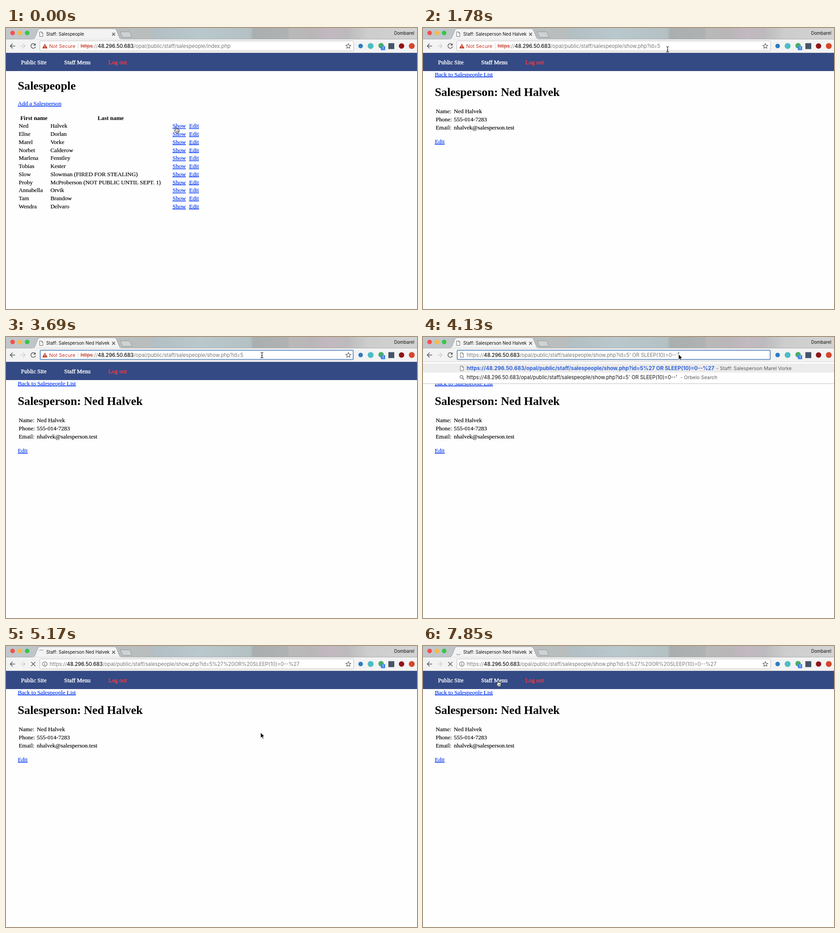
Animation of 904 by 620 pixels, one loop 8 s. Source, as an HTML page:

```html
<!DOCTYPE html>
<html lang="en">
<head>
<meta charset="utf-8">
<title>Staff browser</title>
<style>
html, body { margin: 0; width: 100%; height: 100%; overflow: hidden; background: #fefefe; }
svg { display: block; width: 100vw; height: 100vh; }
text { white-space: pre; }
.page { font: 12.88px "Liberation Serif", serif; fill: #000; stroke: #000; stroke-width: .18px; }
.bold { font-weight: 700; stroke: none; }
.h1 { font-size: 25.75px; font-weight: 700; stroke: none; }
.link { fill: #0035ee; stroke: #0035ee; text-decoration: underline; }
.nav { fill: #fff; stroke: #fff; stroke-width: .4px; }
.out { fill: #fb3b42; stroke: #fb3b42; stroke-width: .35px; }
.tab { font: 9.7px Inter, sans-serif; fill: #111; }
.ui { font: 11.15px Inter, sans-serif; fill: #777; }
.note { font: 10.8px Inter, sans-serif; fill: #5c5c5c; }
.ink { fill: #111; }
.host { fill: #111; font-weight: 500; }
.red { fill: #c53929; }
.strike { fill: #c53929; text-decoration: line-through; }
.hit { font-size: 11.5px; fill: #2f62d9; font-weight: 700; }
.line { fill: none; stroke: #5a5a5a; stroke-width: 1.5; }
.thin { fill: #fff; stroke: #666; stroke-width: 1; }
</style>
</head>
<body>
<svg id="stage" viewBox="0 0 904 620" preserveAspectRatio="none"></svg>
<script>
const LOOP = 8000, STEP = 148;
const HOST = '48.296.50.683';
const DIR = '/opal/public/staff/salespeople/';
const SHOW = 'show.php?id=5';
const PERSON = 'Ned Halvek';
const people = [
  ['Ned', 'Halvek'], ['Elise', 'Dorlan'], ['Marel', 'Vorke'],
  ['Norbet', 'Calderow'], ['Marlena', 'Fenstley'], ['Tobias', 'Kester'],
  ['Slow', 'Slowman (FIRED FOR STEALING)'],
  ['Proby', 'McProberson (NOT PUBLIC UNTIL SEPT. 1)'],
  ['Annabella', 'Orvik'], ['Tam', 'Brandow'], ['Wendra', 'Delvaro']
];

const text = (x, y, s, cls, more = '') => `<text x="${x}" y="${y}" class="${cls}" ${more}>${s}</text>`;
const span = (s, cls) => `<tspan class="${cls}">${s}</tspan>`;
const rect = (x, y, w, h, fill, more = '') => `<rect x="${x}" y="${y}" width="${w}" height="${h}" fill="${fill}" ${more}/>`;
const dot = (x, y, r, fill, more = '') => `<circle cx="${x}" cy="${y}" r="${r}" fill="${fill}" ${more}/>`;
const path = (d, cls, more = '') => `<path d="${d}" class="${cls}" ${more}/>`;
const group = (id, body) => `<g id="${id}">${body}</g>`;
const sheet = (x, y) => path('M-3.5-5H1L3.5-2.5V5H-3.5z M1-5V-2.5H3.5', 'thin', `transform="translate(${x} ${y})"`);

const address = (x, file, scheme = '') =>
  text(x, 43.8, span('https', scheme) + '://' + span(HOST, 'host') + DIR + file, 'ui');

const secureBar = file =>
  path('M85.5 34.5L91.3 45H79.7z', 'red') +
  path('M85.5 38v3.4M85.5 42.4v1.3', '', 'stroke="#fff" stroke-width="1.3"') +
  text(95, 43.8, 'Not Secure', 'ui red', 'style="font-size:10.9px"') +
  rect(158, 34, 1, 12, '#ccc') +
  address(164, file, 'strike');

const listPage =
  text(26, 135.5, 'Salespeople', 'page h1') +
  text(26, 171, 'Add a Salesperson', 'page link') +
  text(31.5, 202.5, 'First name', 'page bold') +
  text(201.5, 202.5, 'Last name', 'page bold') +
  people.map(([first, last], i) => {
    const y = 220.3 + 17.75 * i;
    return text(28, y, first, 'page') + text(97.7, y, last, 'page') +
      text(366.3, y, 'Show', 'page link') + text(402.8, y, 'Edit', 'page link');
  }).join('');

const details = [['Name:', PERSON], ['Phone:', '555-014-7283'], ['Email:', 'nhalvek@salesperson.test']];
const showPage =
  text(26, 106.6, 'Back to Salespeople List', 'page link') +
  text(26, 150, 'Salesperson: ' + PERSON, 'page h1') +
  details.map(([k, v], i) => text(28, 188 + 17.75 * i, k, 'page') + text(67.8, 188 + 17.75 * i, v, 'page')).join('') +
  text(26, 255, 'Edit', 'page link');

const strip = [[0, '#c2c7cc'], [27, '#b8bebf'], [35.3, '#b9bdbd'], [35.8, '#b2bfc4'], [47, '#b9c8cc'],
  [59.4, '#b4c1c4'], [60.2, '#a9aeae'], [68.5, '#b0b2b2'], [69, '#bab9b9'], [74.5, '#b9b6b8'],
  [79, '#c3b9c1'], [83, '#bcbabd'], [88, '#cdcdcd'], [100, '#d3d3d3']]
  .map(([o, c]) => `<stop offset="${o}%" stop-color="${c}"/>`).join('');

const tabStrip =
  rect(0, 0, 904, 25, 'url(#strip)') +
  dot(14.5, 11, 5, '#f4514b') + dot(30.5, 11, 5, '#f7bb40') + dot(46.5, 11, 5, '#35c649') +
  path('M251.5 8.5H270Q272 8.5 273 10.5L277 20.5H259Q256.5 20.5 255.5 18.5z', '', 'fill="#cfd2d3" stroke="#92979a"') +
  text(898, 14.8, 'Dombarel', 'tab', 'text-anchor="end"') +
  rect(0, 24, 904, 31, '#f3f3f3') + rect(0, 24, 904, 1, '#a9adaf') +
  path('M58 25C63 24 64 20 66 15L70 5Q71.5 1.5 75 1.5H238Q241.5 1.5 243 5L247 15C249 20 250 24 254 25z', '', 'fill="#f3f3f3" stroke="#9a9ea0"') +
  rect(58, 24.5, 196, 1.5, '#f3f3f3') +
  path('M233.5 10.5l6.4 6.4m0-6.4l-6.4 6.4', 'line');

const toolbar =
  path('M20 39.7H9.5M14.5 34.5L9.3 39.7L14.5 44.9', 'line') +
  path('M31.5 39.7H42M37 34.5L42.2 39.7L37 44.9', 'line', 'style="stroke:#cfcfcf"') +
  group('reload', path('M63.8 36.3A5.1 5.1 0 1 0 64.8 41.2', 'line') + path('M65.2 33.8V38.8H60.2z', '', 'fill="#5a5a5a"')) +
  group('stop', path('M55.5 35.3l9 9m0-9l-9 9', 'line')) +
  rect(74.5, 28.5, 690, 22, '#fff', 'rx="2" stroke="#bdbdbd"') +
  group('focus', rect(75.5, 29.5, 688, 20, '#fff', 'rx="1.5" stroke="#759fd0" stroke-width="2"')) +
  group('star', path('M753 34.3l1.6 3.6 3.9.4-2.9 2.6.8 3.8-3.4-2-3.4 2 .8-3.8-2.9-2.6 3.9-.4z', 'line', 'style="stroke-width:1.1"')) +
  dot(780, 39.7, 5, '#2b7cc4') + dot(802, 39.7, 6.5, '#4bbec2') +
  dot(825, 39, 6, '#48ad68') + rect(824.5, 40, 9.5, 9, '#4287ed', 'rx="1"') +
  text(829.3, 47.3, '1', 'tab', 'text-anchor="middle" style="font-size:7.5px;fill:#fff"') +
  rect(841, 33.5, 13, 13, '#455467') + dot(870, 39.7, 6, '#8f1519') + dot(892.5, 39.7, 6.5, '#d4472e');

const pasted = "' OR SLEEP(10)=0--'";
const dropdown =
  rect(0, 54, 904, 50, '#000', 'opacity=".07"') + rect(0, 54, 904, 48.5, '#fff') +
  rect(0, 54, 904, 1, '#cfcfcf') + rect(0, 58.5, 904, 20, '#ececec') + rect(0, 102, 904, 1, '#d2d2d2') +
  sheet(85.5, 69) +
  text(96, 72.9, `https://${HOST}${DIR}${SHOW}%27 OR SLEEP(10)=0--%27`, 'ui hit') +
  text(645, 72.9, '- Staff: Salesperson Marel Vorke', 'note') +
  dot(84.6, 88, 3.2, 'none', 'stroke="#666" stroke-width="1.2"') + path('M87 90.5l3.3 3.3', 'line') +
  text(96, 93, `https://${HOST}${DIR}${SHOW}${pasted}`, 'ui ink') +
  text(566, 93, '- Orbelo Search', 'note');

const infoIcon =
  dot(85.5, 39.7, 5, 'none', 'stroke="#555" stroke-width="1.1"') +
  rect(84.9, 38.7, 1.3, 4, '#555') + rect(84.9, 36.6, 1.3, 1.3, '#555');

const pointers =
  group('arrow', path('M0 0V12L2.8 9.4L4.7 13.7L6.7 12.8L4.9 8.7H8.7z', '', 'fill="#000" stroke="#fff" stroke-width=".9"')) +
  group('hand', path('M-.6 7.5V1.3Q.5-.6 1.6 1.3V5Q2.8 4 3.7 5.2Q5 4.4 5.9 5.6Q7.5 5.2 7.9 6.8V9.5L6.7 13.3H1.4L-2.6 8.5Q-2.5 6.5-.6 7.9z M2 8.5v2.5M4 8.5v2.5M6 8.5v2.5', '', 'fill="#fff" stroke="#111"')) +
  group('beam', path('M-3-6Q-.5-6 0-4.5Q.5-6 3-6M-3 6Q-.5 6 0 4.5Q.5 6 3 6M0-4.5V4.5M-1.5 1H1.5', '', 'fill="none" stroke="#111" stroke-width="1.1"'));

document.getElementById('stage').innerHTML =
  `<defs><linearGradient id="strip">${strip}</linearGradient></defs>` +
  rect(0, 0, 904, 620, '#fefefe') +
  rect(0, 55, 904, 40, '#344a84') +
  text(33, 80, 'Public Site', 'page nav') + text(128, 80, 'Staff Menu', 'page nav') + text(225.3, 80, 'Log out', 'page out') +
  group('list', listPage) + group('show', showPage) + tabStrip +
  group('listTab', text(88.5, 17.3, 'Staff: Salespeople', 'tab')) +
  group('showTab', text(88.5, 17.3, 'Staff: Salesperson ' + PERSON, 'tab')) +
  group('tabIcon', sheet(77.5, 13.7)) +
  group('spinner', path('M-4.3-3.4A5.5 5.5 0 0 1 3.9-3.9', '', 'fill="none" stroke="#9fa7bd" stroke-width="1.6"')) +
  toolbar + rect(0, 54, 904, 1, '#d0d0d0') +
  group('listUrl', secureBar('index.php')) +
  group('showUrl', secureBar(SHOW)) +
  group('typed', dropdown + sheet(85.5, 39.7) + address(96, SHOW + pasted) + rect(562, 33, 1, 13, '#222')) +
  group('loading', infoIcon + address(96, SHOW + '%27%20OR%20SLEEP(10)=0--%27')) +
  pointers;

const el = id => document.getElementById(id);
const show = (id, on) => el(id).setAttribute('display', on ? 'inline' : 'none');
const move = (id, x, y, a = 0) => el(id).setAttribute('transform', `translate(${x} ${y}) rotate(${a})`);

// Pointer path: time, x, y, shape from that time on
const track = [
  [0, 373, 218, 'hand'], [592, 373, 218, 'hand'], [740, 380, 212, 'arrow'], [1628, 536, 46, 'arrow'],
  [1776, 538, 47, 'beam'], [2072, 540, 46, 'beam'], [2516, 563, 40, 'beam'], [3848, 563, 40, 'beam'],
  [3996, 562, 38, 'arrow'], [4588, 562, 38, 'arrow'], [5180, 560, 191, 'arrow'], [5476, 561, 214, 'arrow'],
  [5920, 560, 212, 'arrow'], [6660, 203, 30, 'arrow'], [6808, 202, 28, 'arrow'], [7104, 203, 30, 'arrow'],
  [7696, 207, 74, 'arrow'], [7844, 164, 76, 'hand'], [8000, 164, 76, 'hand']
];

function pointer(t) {
  let i = 0;
  while (i < track.length - 2 && t >= track[i + 1][0]) i++;
  const [t0, x0, y0, shape] = track[i], [t1, x1, y1] = track[i + 1];
  const u = (t - t0) / (t1 - t0), e = u * u * (3 - 2 * u);
  return [shape, x0 + (x1 - x0) * e, y0 + (y1 - y0) * e];
}

function draw(time) {
  const k = Math.floor((time + 12) / STEP);
  const opened = k >= 5, typing = k >= 27 && k < 30, busy = k >= 30;
  show('list', !opened);
  show('listTab', !opened);
  show('listUrl', !opened);
  show('show', opened);
  show('showTab', opened);
  show('showUrl', opened && k < 27);
  show('focus', k >= 17 && !busy);
  show('typed', typing);
  show('loading', busy);
  show('star', !typing);
  show('reload', !busy);
  show('stop', busy);
  show('tabIcon', !busy);
  show('spinner', busy);
  move('spinner', 77.5, 14, (k - 35) * 90);
  const [shape, x, y] = pointer(k * STEP);
  for (const id of ['arrow', 'hand', 'beam']) show(id, id === shape);
  move(shape, x, y);
}

const start = performance.now();
function tick() {
  draw((performance.now() - start) % LOOP);
  requestAnimationFrame(tick);
}
tick();
</script>
</body>
</html>
```
